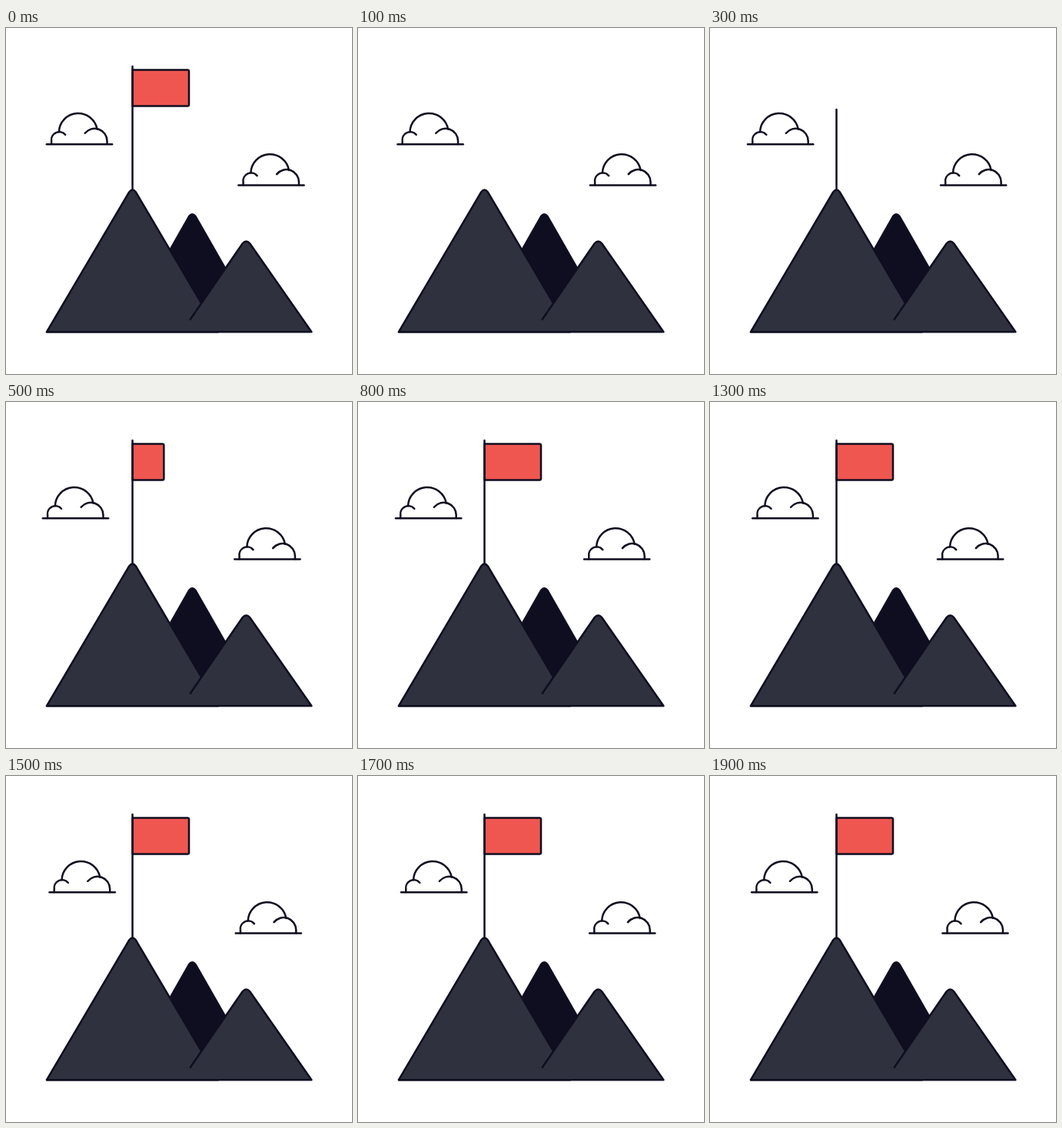
Recreate the animation shown at these times as an HTML page. Size 450 by 450 pixels, loop 2000 ms.

```html
<!DOCTYPE html>
<html lang="en">
<head>
<meta charset="utf-8">
<title>Summit flag</title>
<style>
  html, body { margin: 0; width: 100%; height: 100%; overflow: hidden; background: #fff; }
  svg { display: block; width: 100vw; height: 100vh; }
</style>
</head>
<body>
<svg viewBox="0 0 450 450">
  <defs>
    <g id="cloud">
      <path d="M53 151.2H138.2"/>
      <path d="M59.2 151V147A10.3 10.3 0 0 1 77.2 138.8"/>
      <path d="M69 135.2A25 25 0 0 1 118.6 131.6"/>
      <path d="M102.8 136.8A16.2 16.2 0 0 1 131.6 147V151"/>
    </g>
  </defs>
  <g fill="none" stroke="#0f0e20" stroke-width="2.5" stroke-linecap="round" stroke-linejoin="round">
    <use id="left" href="#cloud"/>
    <use id="right" href="#cloud"/>
    <path id="flag" fill="#f05650"/>
    <path id="pole"/>
    <path fill="#0f0e20" d="M155 391L238 245Q242.2 239.6 246.6 245L330 391Z"/>
    <path fill="#30313f" d="M53 395.2L160.3 213.2Q164.5 208 168.7 213.2L276 395.2Z"/>
    <path fill="#30313f" stroke="none" d="M228.8 395.2L307.8 280Q312.4 275.2 317 280L397.4 395.2Z"/>
    <path d="M239.7 379L307.8 280Q312.4 275.2 317 280L397.4 395.2H53"/>
  </g>
</svg>
<script>
  const LOOP = 2000, STEP = 100;
  const get = id => document.getElementById(id);
  const [left, right, flag, pole] = ['left', 'right', 'flag', 'pole'].map(get);

  const span = (t, from, to) => Math.min(1, Math.max(0, (t - from) / (to - from)));
  const easeOut = p => 1 - (1 - p) ** 2;
  const sway = (t, peak) => 4.4 * Math.cos((t - peak) / LOOP * 2 * Math.PI);

  function place(cloud, x, y) {
    cloud.setAttribute('transform', `translate(${x.toFixed(2)} ${y})`);
  }

  function draw(t) {
    place(left, -0.8 + sway(t, 1550), 0);
    place(right, 245 + sway(t, 1950), 53.3);

    // The full flag is shown first, then it is raised again from the summit.
    const raised = t < 100;
    const rise = raised ? 1 : span(t, 100, 400);
    const open = raised ? 1 : easeOut(span(t, 400, 700));

    pole.setAttribute('d', `M164.5 218V${218 - 168 * rise}`);
    const w = 73.5 * open, r = Math.min(2, w / 2);
    flag.style.display = open ? '' : 'none';
    flag.setAttribute('d',
      `M164.5 54.4h${w - r}q${r} 0 ${r} 2v43.2q0 2 ${-r} 2H164.5Z`);
  }

  function tick() {
    const t = performance.now() % LOOP;
    draw(Math.floor(t / STEP) * STEP);
    requestAnimationFrame(tick);
  }
  tick();
</script>
</body>
</html>
```
